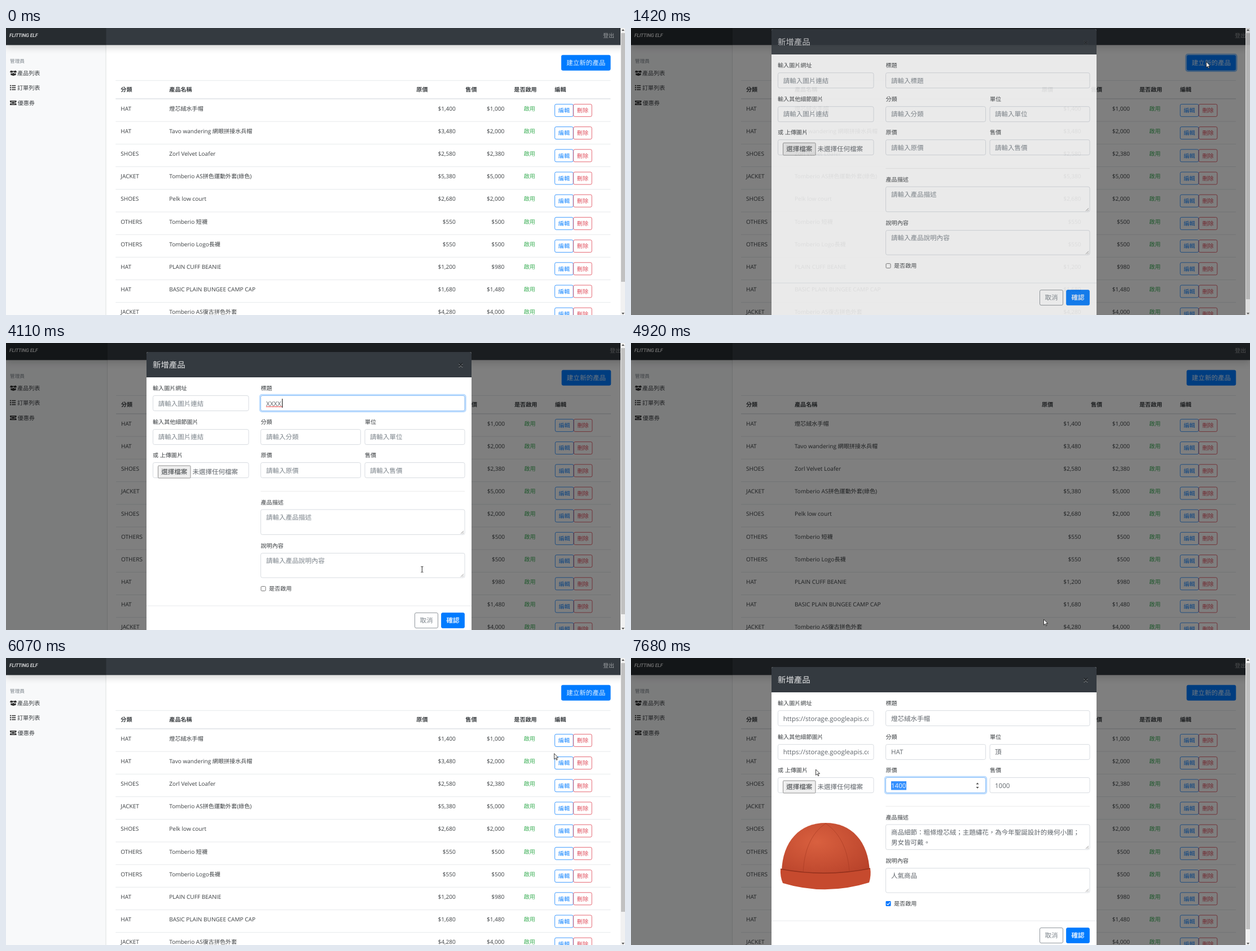
Write an HTML page that moves like this. It is 1097 px wide and 510 px high and loops after 8 s.

```html
<!DOCTYPE html>
<html lang="zh-Hant">
<head>
<meta charset="utf-8">
<title>產品列表</title>
<style>
  html, body { margin: 0; width: 100%; height: 100%; overflow: hidden; background: #fff; }
  svg { display: block; }
  text {
    font-family: 'Open Sans', 'Noto Sans CJK TC', 'Noto Sans CJK', sans-serif;
    fill: #212529; fill-opacity: .88; white-space: pre; text-rendering: geometricPrecision;
  }
  .mid { text-anchor: middle; }
  .end { text-anchor: end; }
  .bold { font-weight: 600; }
  .btn rect { fill: transparent; stroke: currentColor; stroke-width: .75; }
  .btn text { fill: currentColor; }
  .btn.hover rect { fill: currentColor; }
  .btn.solid rect { fill: #007bff; stroke: #007bff; }
  .btn.solid.hover rect { fill: #0069d9; stroke: #0062cc; }
  .btn.solid text, .btn.hover text { fill: #fff; }
  .field { fill: #fff; stroke: #ced4da; stroke-width: .8; }
  .focus { fill: none; stroke: #80bdff; stroke-width: .8; }
  .hint { fill: #6c757d; }
  .value { fill: #495057; }
  .ring { fill: none; stroke: #268fff; stroke-width: 2.3; }
  .nav { filter: drop-shadow(0 5.8px 5.8px rgba(0, 0, 0, .15)); }
</style>
</head>
<body>
<svg id="stage" width="1097" height="510" viewBox="0 0 1097 510"></svg>
<script>
const LOOP = 8000, SMALL = 10.08, BASE = 11.52, ROW = 40.2;

// y is the visual middle of the line
const text = (x, y, str, size = SMALL, attrs = '') =>
  `<text x="${x}" y="${y + size * .37}" font-size="${size}" ${attrs}>${str}</text>`;
const rect = (x, y, w, h, attrs = '') => `<rect x="${x}" y="${y}" width="${w}" height="${h}" ${attrs}/>`;
const line = (x1, x2, y, color = '#dee2e6', w = .75) =>
  `<path d="M${x1} ${y}H${x2}" stroke="${color}" stroke-width="${w}"/>`;
const group = (id, body, attrs = '') => `<g id="${id}" ${attrs}>${body}</g>`;
const button = (x, y, w, h, label, color, size = SMALL, kind = '') =>
  `<g class="btn ${kind}" data-box="${x},${y},${w},${h}" color="${color}">` +
  rect(x, y, w, h, 'rx="2.5"') + text(x + w / 2, y + h / 2, label, size, 'class="mid"') + '</g>';
const field = (x, y, w, h = 27) => rect(x, y, w, h, 'class="field" rx="2.9"');
const hint = (x, y, str) => text(x, y, str, BASE, 'class="hint"');
const value = (x, y, str, attrs = '') => text(x, y, str, BASE, `class="value" ${attrs}`);
const ring = (id, x, y, w, h, alpha) =>
  rect(x - 1.2, y - 1.2, w + 2.4, h + 2.4, `id="${id}" class="ring" rx="3.6" opacity="${alpha}"`);
const scrollbar = bottom =>
  rect(1089, 0, 8, 510, 'fill="#f1f1f1"') + rect(1090, 9, 7, bottom - 9, 'fill="#c1c1c1"') +
  '<path d="M1091 5l2.5-3 2.5 3zM1091 506l2.5 3 2.5-3z" fill="#505050"/>';

const products = [
  ['HAT', '燈芯絨水手帽', '$1,400', '$1,000'],
  ['HAT', 'Tavo wandering 網眼拼接水兵帽', '$3,480', '$2,000'],
  ['SHOES', 'Zorl Velvet Loafer', '$2,580', '$2,380'],
  ['JACKET', 'Tomberio AS拼色運動外套(綠色)', '$5,380', '$5,000'],
  ['SHOES', 'Pelk low court', '$2,680', '$2,000'],
  ['OTHERS', 'Tomberio 短襪', '$550', '$500'],
  ['OTHERS', 'Tomberio Logo長襪', '$550', '$500'],
  ['HAT', 'PLAIN CUFF BEANIE', '$1,200', '$980'],
  ['HAT', 'BASIC PLAIN BUNGEE CAMP CAP', '$1,680', '$1,480'],
  ['JACKET', 'Tomberio AS復古拼色外套', '$4,280', '$4,000'],
];

const productRow = ([kind, name, price, sale], i) => {
  const y = 142.8 + ROW * i, top = 135.4 + ROW * i;
  return text(204, y, kind) + text(290, y, name) +
    text(797.5, y, price, SMALL, 'class="end"') + text(884, y, sale, SMALL, 'class="end"') +
    text(928.5, y, '啟用', SMALL, 'class="mid" style="fill:#28a745"') +
    button(973.3, top, 32.6, 22, '編輯', '#007bff') + button(1006.3, top, 32.6, 22, '刪除', '#dc3545') +
    line(195, 1072, 125.9 + ROW * (i + 1));
};

const headers = [[204, '分類'], [290, '產品名稱'], [728, '原價'], [815, '售價'], [901, '是否啟用'], [973, '編輯']];
const content = group('content',
  button(985, 48.3, 86.8, 26.9, '建立新的產品', '#007bff', BASE, 'solid') +
  ring('createRing', 984.6, 47.9, 87.6, 27.7, .5) +
  line(195, 1072, 93.3) + line(195, 1072, 125.8, '#dee2e6', 1.4) +
  headers.map(([x, s]) => text(x, 109.5, s, SMALL, 'class="bold"')).join('') +
  products.map(productRow).join('') +
  ring('editRing', 972.9, 135, 33.4, 22.8, .5));

const icons =
  `<g fill="#333"><path d="M8.5 75.5l4.5 1 4.5-1 1.8 3-4 1.3-2.3-2.4-2.3 2.4-4-1.3z
    M8.3 80.3l2.8.8 1.9-1.9 1.9 1.9 2.8-.8v3.2l-4.7 1.4-4.7-1.4z"/>` +
  [102.5, 106, 109.5].map(y => rect(7, y - 1, 2, 2) + rect(10.2, y - .8, 7, 1.6)).join('') +
  `<path d="M7 129h11.5v2.6a1.5 1.5 0 0 0 0 3v2.4H7v-2.4a1.5 1.5 0 0 0 0-3z"/>
  <path d="M9.7 131h6v4h-6z" fill="none" stroke="#f8f9fa" stroke-width=".8"/></g>`;

const sidebar =
  rect(0, 30, 180, 480, 'id="side" fill="#f8f9fa"') +
  rect(179, 30, 1, 480, 'id="sideEdge" fill="#e0e1e2"') +
  text(7, 59, '管理員', 8.64, 'class="hint"') + icons +
  text(20, 80, '產品列表') + text(20, 106.5, '訂單列表') + text(20.7, 133, '優惠券');

const navbar =
  rect(0, 0, 1097, 30.3, 'class="nav" fill="#343a40"') +
  rect(0, 0, 180, 30.3, 'id="brand" opacity=".25"') +
  text(6, 12.7, 'FLITTING ELF', 8.8, 'style="font:italic 500 8.8px Roboto,sans-serif;fill:#fff;letter-spacing:-.2px"') +
  text(1070, 13.5, '登出', SMALL, 'id="logout" style="fill:#fff;fill-opacity:.5"');

const labels = [
  [260, 80, '輸入圖片網址'], [260, 140, '輸入其他細節圖片'], [260, 199, '或 上傳圖片'],
  [451.5, 80, '標題'], [451.5, 140, '分類'], [636, 140, '單位'], [451.5, 199, '原價'], [636, 199, '售價'],
  [451.5, 283, '產品描述'], [451.5, 360, '說明內容'], [466, 436.5, '是否啟用'],
];
const fields = [
  [260.5, 93.5, 169.5], [260.5, 153.5, 169.5], [260.5, 212.5, 169.5], [451.5, 93.5, 361.5],
  [451.5, 153.5, 177], [636, 153.5, 177], [451.5, 212.5, 177], [636, 212.5, 177],
  [451.5, 296, 361.5, 44.5], [451.5, 373.5, 361.5, 43.5],
];

const emptyForm = group('emptyForm',
  hint(269.7, 107.5, '請輸入圖片連結') + hint(269.7, 167, '請輸入圖片連結') +
  group('titleHint', hint(461, 107.5, '請輸入標題')) +
  hint(461, 167, '請輸入分類') + hint(645, 167, '請輸入單位') +
  hint(461, 226.5, '請輸入原價') + hint(645, 226.5, '請輸入售價') +
  hint(461, 310, '請輸入產品描述') + hint(461, 387, '請輸入產品說明內容') +
  value(461, 107.5, '', 'id="typed"') +
  `<path id="squiggle" d="M461 114${'l1.2-1.5 1.2 1.5'.repeat(12)}" fill="none" stroke="#e33" stroke-width=".9"/>` +
  rect(460.8, 99, 1, 16, 'id="caret"') +
  rect(452, 432.5, 8, 8, 'rx="1.4" fill="#fff" stroke="#767676"'));

const hat = `<g>
  <path d="M267 380C268 325 300 293 345 293S421 325 423 380Q345 398 267 380Z" fill="url(#felt)"/>
  <path d="M345 294C318 312 306 345 305 384M345 294C372 312 386 345 387 384" fill="none" stroke="#a53a22" opacity=".6"/>
  <path d="M265 375Q345 390 424 374Q426 386 422 399Q345 423 269 400Q264 388 265 375Z" fill="#c64a2e"/>
  <path d="M265 375Q345 390 424 374" fill="none" stroke="#93301c" stroke-width="1.5"/></g>`;

const url = 'https://storage.googleapis.com/';
const filledForm = group('filledForm',
  `<g clip-path="url(#urlClip)">${value(269.7, 107.5, url)}${value(269.7, 167, url)}</g>` +
  value(461, 107.5, '燈芯絨水手帽') + value(461, 167, 'HAT') + value(645, 167, '頂') +
  rect(461, 219, 27, 15.5, 'id="selection" fill="#3390ff"') + value(461, 226.5, '1400', 'id="price"') +
  '<path id="spinner" d="M611.5 224.5l2.5-3 2.5 3zM611.5 229l2.5 3 2.5-3z" fill="#505050"/>' +
  value(645, 226.5, '1000') +
  value(461, 310, '商品細節：粗條燈芯絨；主題繡花，為今年聖誕設計的幾何小圖；') +
  value(461, 327.3, '男女皆可戴。') + value(461, 387, '人氣商品') + hat +
  rect(451.5, 432, 9, 9, 'rx="1.4" fill="#0075ff"') +
  '<path d="M453.3 436.6l2 2 3.6-4.2" fill="none" stroke="#fff" stroke-width="1.3"/>');

const grip = y => `<path d="M806 ${y}l5-5M809 ${y}l2-2" stroke="#777" stroke-width=".8"/>`;
const focus = (id, x, y, w, h) =>
  group(id, rect(x, y, w, h, 'class="focus" rx="2.9"') + ring('', x - .4, y - .4, w + .8, h + .8, .3));
const dialog = group('dialog',
  rect(249, 16, 576, 520, 'rx="3" fill="#fff"') +
  '<path d="M249 61V19a3 3 0 0 1 3-3H822a3 3 0 0 1 3 3V61Z" fill="#343a40"/>' +
  text(260, 38.5, '新增產品', 14.4, 'style="fill:#fff"') +
  text(806, 39.7, '×', 17.3, 'class="mid bold" style="fill:#fff" opacity=".5"') +
  text(806, 39, '×', 17.3, 'class="mid bold" style="fill:#16191c"') +
  fields.map(f => field(...f)).join('') +
  labels.map(([x, y, s]) => text(x, y, s)).join('') +
  rect(269.5, 218, 57.5, 22, 'rx="1.5" fill="#efefef" stroke="#767676" stroke-width=".8"') +
  text(298.3, 229, '選擇檔案', BASE, 'class="mid"') + value(330.5, 229, '未選擇任何檔案') +
  line(451.5, 813, 263.5, '#e5e5e5') + line(249, 825, 467, '#dee2e6') +
  grip(339) + grip(415.5) +
  focus('titleFocus', 451.5, 93.5, 361.5, 27) + focus('priceFocus', 451.5, 212.5, 177, 27) +
  emptyForm + filledForm +
  button(724.5, 479.5, 41, 27, '取消', '#6c757d', BASE, 'modal') +
  button(771.5, 479.5, 41, 27, '確認', '#007bff', BASE, 'solid bold modal'));

const pointer = group('arrow', '<path d="M.5 0V10.2L2.9 8 4.5 11.6 6 11 4.4 7.4H7.5Z" fill="#fff" stroke="#111" stroke-width=".8"/>') +
  group('beam', '<path d="M-2-5H-.5L0-4.5.5-5H2M0-4.5V4.5M-2 5H-.5L0 4.5.5 5H2" fill="none" stroke="#111" stroke-width=".9"/>');

const stage = document.getElementById('stage');
stage.innerHTML =
  `<defs><radialGradient id="felt" cx=".4" cy=".35" r=".75"><stop stop-color="#d9603f"/><stop offset="1" stop-color="#b8422a"/></radialGradient>
  <clipPath id="urlClip">${rect(269, 90, 152, 95)}</clipPath></defs>` +
  rect(0, 0, 1097, 510, 'fill="#fff"') + content + sidebar + navbar +
  group('pageBar', scrollbar(451)) + rect(0, 0, 1097, 510, 'id="backdrop"') +
  group('modal', dialog + scrollbar(482)) + pointer;

const ui = {};
stage.querySelectorAll('[id]').forEach(el => { ui[el.id] = el; });
const buttons = [...stage.querySelectorAll('.btn')].map(el => ({
  el, box: el.dataset.box.split(',').map(Number), inModal: el.classList.contains('modal'),
}));

// time, x, y
const path = [
  [70, 1070, 497], [300, 1012, 400], [450, 985, 300], [620, 1000, 180], [830, 1025, 69], [940, 1019, 60],
  [1620, 1019, 60], [1700, 920, 85], [1820, 720, 132], [1950, 590, 116], [2060, 542, 104],
  [3830, 542, 104], [4110, 737, 402], [4260, 791, 440], [4440, 750, 488], [4590, 731, 491],
  [5080, 731, 491], [5450, 881, 283], [5850, 950, 195], [6270, 990, 147], [6420, 990, 147], [6540, 944, 156],
  [6800, 740, 205], [7090, 570, 229], [7200, 520, 228], [7320, 470, 236], [7420, 430, 246],
  [7560, 345, 212], [7630, 320, 196], [7680, 327, 198],
];
const clamp = v => Math.max(0, Math.min(1, v));
const pointerAt = t => {
  const i = path.findIndex(k => k[0] > t);
  if (i < 0) return path[path.length - 1].slice(1);
  const b = path[i], a = path[Math.max(0, i - 1)];
  const p = clamp((t - a[0]) / (b[0] - a[0] || 1));
  return [a[1] + (b[1] - a[1]) * p, a[2] + (b[2] - a[2]) * p];
};
const show = (el, on) => { el.style.display = on ? '' : 'none'; };
const move = (el, x, y) => el.setAttribute('transform', `translate(${x} ${y})`);
const within = (t, a, b) => t >= a && t < b;
const inside = (x, y, [bx, by, w, h]) => x >= bx && x <= bx + w && y >= by && y <= by + h;
const easeOut = p => 1 - (1 - p) ** 1.75;

// backdrop fades first, then the dialog; closing runs the other way round
const OPEN = [1145, 6396], CLOSE = 4695;
function modalState(t) {
  if (within(t, CLOSE, OPEN[1])) {
    return {
      shade: .5 * (1 - clamp((t - CLOSE - 300) / 150)),
      alpha: 1 - clamp((t - CLOSE) / 150),
      slide: easeOut(clamp((t - CLOSE) / 300)),
    };
  }
  const since = t - (t < CLOSE ? OPEN[0] : OPEN[1]);
  return {
    shade: .5 * clamp(since / 150),
    alpha: clamp((since - 150) / 150),
    slide: 1 - easeOut(clamp((since - 150) / 300)),
  };
}

function render(t) {
  const { shade, alpha, slide } = modalState(t);
  const narrow = shade === 0, width = narrow ? 177.5 : 180;
  move(ui.content, narrow ? -.7 : 0, 0);
  ui.side.setAttribute('width', width);
  ui.brand.setAttribute('width', width);
  ui.sideEdge.setAttribute('x', width - 1);
  ui.logout.setAttribute('x', narrow ? 1058 : 1070);
  show(ui.pageBar, narrow);
  ui.backdrop.setAttribute('opacity', shade);
  ui.modal.setAttribute('opacity', alpha);
  show(ui.modal, alpha > 0);
  move(ui.dialog, 0, -36 * slide);

  show(ui.createRing, within(t, 1100, 1690));
  show(ui.editRing, within(t, 6370, 6900));
  const typed = clamp(Math.floor((t - 2510) / 130) / 4) * 4;
  const filled = t >= OPEN[1];
  show(ui.emptyForm, !filled);
  show(ui.filledForm, filled);
  show(ui.titleFocus, within(t, 2050, 4680));
  show(ui.titleHint, typed === 0);
  ui.typed.textContent = 'X'.repeat(typed);
  show(ui.squiggle, t >= 3930);
  show(ui.caret, within(t, 2050, 2510) || within(t, 2640, 3590) || within(t, 4100, 4640));
  ui.caret.setAttribute('x', 460.8 + 7.1 * typed);

  const selected = t >= 7300;
  show(ui.priceFocus, t >= 7160);
  show(ui.spinner, t >= 7090);
  show(ui.selection, selected);
  ui.price.style.fill = selected ? '#fff' : '';

  const [x, y] = pointerAt(t);
  const overText = alpha === 1 && fields.some(([fx, fy, w, h = 27], i) => i !== 2 && inside(x, y, [fx, fy, w, h]));
  show(ui.arrow, t >= 70 && !overText);
  show(ui.beam, overText);
  move(ui.arrow, x, y);
  move(ui.beam, x, y);
  for (const { el, box, inModal } of buttons) {
    el.classList.toggle('hover', t >= 70 && inModal === alpha > 0 && inside(x, y, box));
  }
}

const start = performance.now();
(function tick() {
  render((performance.now() - start) % LOOP);
  requestAnimationFrame(tick);
})();
</script>
</body>
</html>
```
